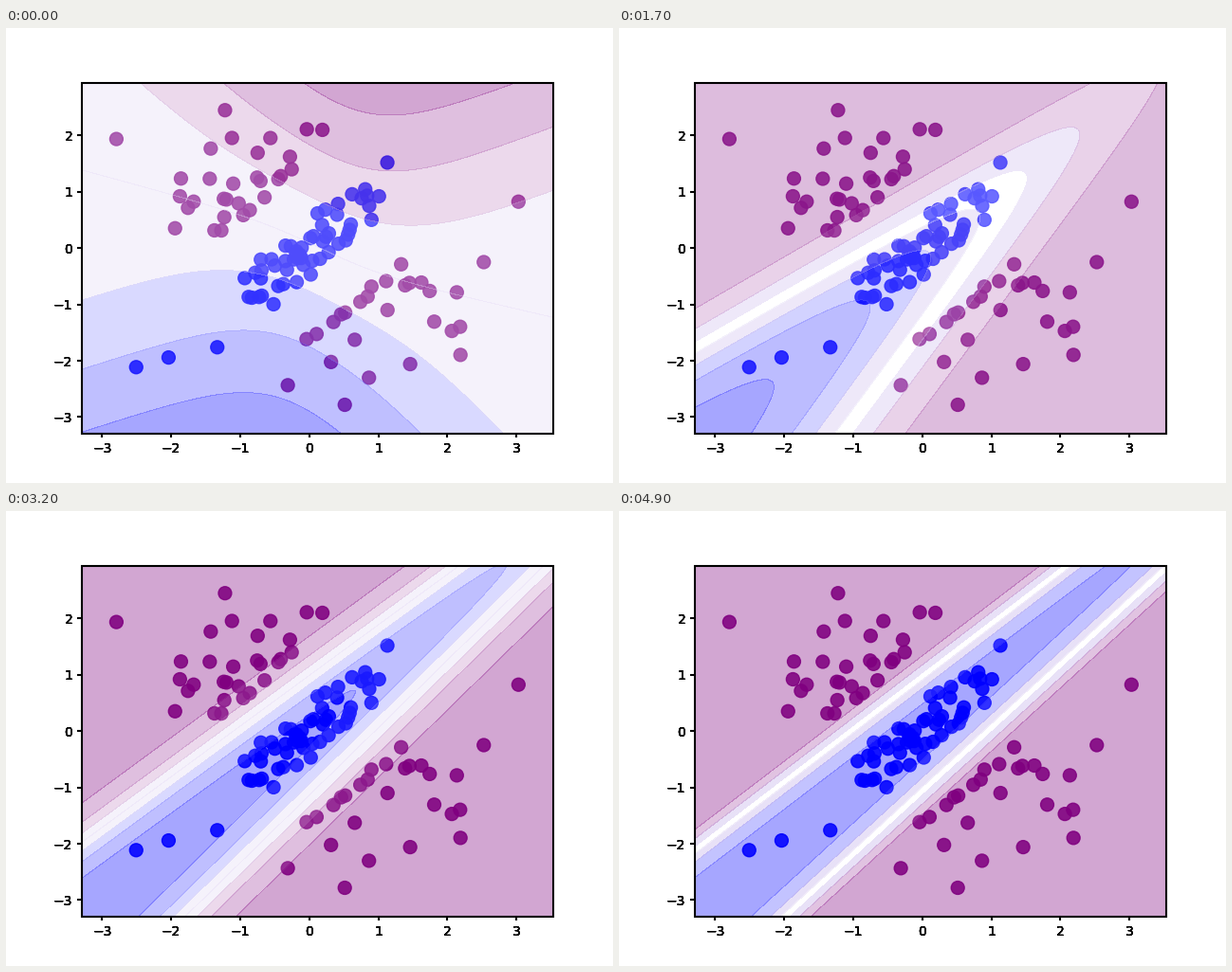
Recreate the animation shown at these times as a matplotlib script. Size 640 by 480 pixels, loop 5 s.

```python
import numpy as np
import matplotlib.pyplot as plt
from matplotlib.animation import FuncAnimation

FRAMES, INTERVAL = 50, 100
BLUE, PURPLE, LAVENDER = (0, 0, 1), (.502, 0, .502), (.25, 0, .75)

# Normal samples: class by distance from the diagonal, with a margin left empty.
samples = np.random.RandomState(1).randn(200, 2)
offset = np.abs(samples[:, 1] - samples[:, 0])
points = samples[(offset < .5) | (offset > 1.5)]
classes = [BLUE if abs(y - x) < .5 else PURPLE for x, y in points]
(x0, y0), (x1, y1) = points.min(0) - .5, points.max(0) + .49
gx, gy = np.meshgrid(np.linspace(x0, x1, 220), np.linspace(y0, y1, 180))


def soft_max(a, b, sharpness):
    return np.logaddexp(sharpness * a, sharpness * b) / sharpness


def corners(high, low, sharpness=6):
    """A purple rise and a blue dip, each bounded by two planes (c, x, y)."""
    h1, h2 = (c + ax * gx + ay * gy for c, ax, ay in high)
    l1, l2 = (c + ax * gx + ay * gy for c, ax, ay in low)
    rise = -soft_max(-h1, -h2, sharpness)
    dip = soft_max(l1, l2, sharpness)
    return soft_max(rise, 0, sharpness) - soft_max(-dip, 0, sharpness)


def valley(upper, lower, high, low, sharpness=2):
    """A blue valley between two lines (slope, intercept, steepness)."""
    (m1, n1, k1), (m2, n2, k2) = upper, lower
    g = soft_max(k1 * (gy - m1 * gx - n1), k2 * (m2 * gx + n2 - gy), sharpness)
    limit = np.where(g > 0, high, low)
    return limit * np.tanh(g / limit)


# Stages of training: (frame, number of colour bins, surface)
STAGES = [
    (0, 8, corners(high=[(.17, .24, .215), (.36, -.115, .25)],
                   low=[(-.30, -.092, .23), (-.26, .24, .19)])),
    (6, 8, corners(high=[(.39, .212, 0), (-.046, 0, .30)],
                   low=[(-.43, .23, 0), (-.28, -.076, .31)])),
    (17, 9, valley((.712, .58, 1.10), (1.65, -1.42, .515), .70, .95)),
    (23, 7, valley((.919, .983, 1.26), (1.328, -1.255, .90), 1.0, 1.0)),
    (32, 8, valley((.90, .99, 1.60), (1.198, -1.14, 1.26), .88, .95)),
    (38, 8, valley((.912, .97, 2.28), (1.145, -1.08, 2.10), 1.1, .90)),
    (49, 7, valley((.937, .973, 2.20), (1.122, -1.067, 1.94), 1.3, .83)),
]


def bin_colors(bins):
    colors = []
    for s in np.linspace(-1, 1, bins):
        hue = LAVENDER if abs(s) < .4 else BLUE if s < 0 else PURPLE
        colors.append(tuple(1 - abs(s) * (1 - np.array(hue))))
    return colors


def surface_at(frame):
    for (start, bins_a, a), (end, bins_b, b) in zip(STAGES, STAGES[1:]):
        if frame <= end:
            t = (frame - start) / (end - start)
            return (1 - t) * a + t * b, bins_b if t > .5 else bins_a


fig = plt.figure(figsize=(6.4, 4.8), dpi=100)

# Stacked axes repeat the tick labels, which gives the heavy lettering.
stack = [fig.add_axes([.125, .11, .775, .77], xlim=(x0, x1), ylim=(y0, y1), frame_on=False)
         for _ in range(6)]
for layer in stack:
    layer.tick_params(width=0)
ax = stack[0]
ax.tick_params(width=1.5)
fig.add_artist(plt.Rectangle((80 / 640, 52 / 480), 497 / 640, 370 / 480,
                             fill=False, edgecolor="black", linewidth=1.5))
ax.scatter(points[:, 0], points[:, 1], s=100, color=classes, alpha=.88, zorder=.9)

shown = []


def update(frame):
    while shown:
        shown.pop().remove()
    z, bins = surface_at(frame)
    shown.append(ax.contourf(gx, gy, np.clip(z, -.999, .999),
                             levels=np.linspace(-1, 1, bins + 1),
                             colors=bin_colors(bins), alpha=.35, zorder=1))
    return shown


animation = FuncAnimation(fig, update, frames=FRAMES, interval=INTERVAL,
                          repeat=True, repeat_delay=0, blit=False)
plt.show()
```
